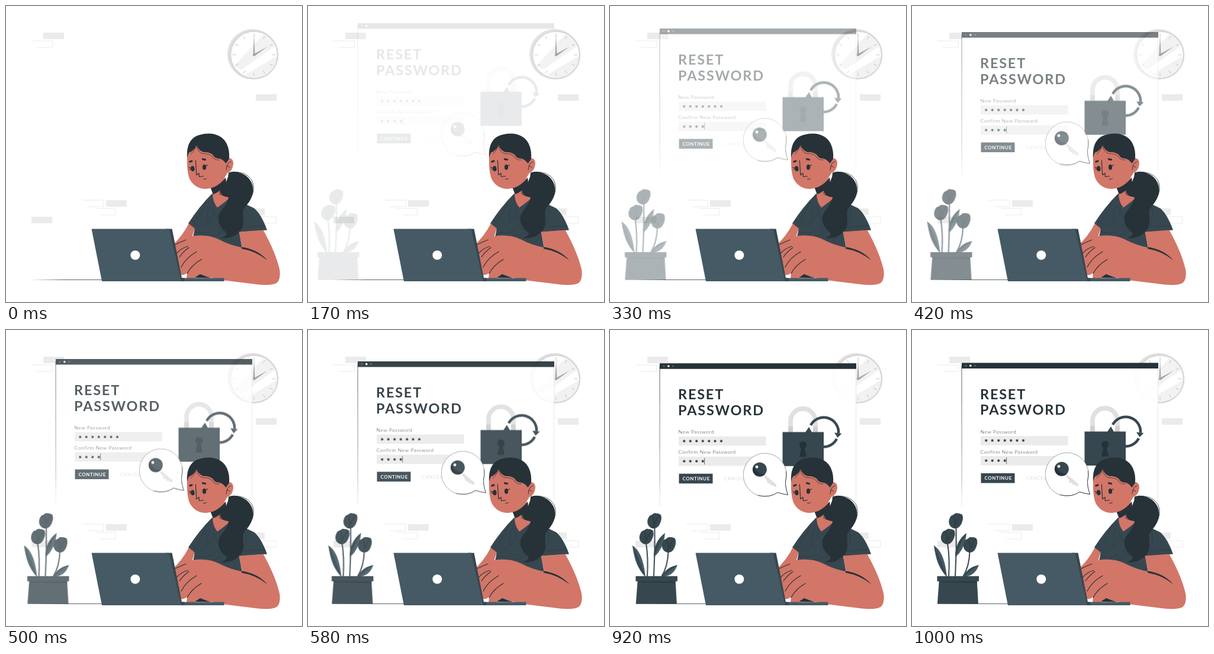
These frames come from a looping animation (500x500 px, 1040 ms). An HTML page without scripts:

```html
<!DOCTYPE html>
<html lang="en">
<head>
<meta charset="utf-8">
<title>Reset password</title>
<style>
  html, body { margin: 0; width: 100%; height: 100%; overflow: hidden; background: #fff; }
  svg { display: block; width: 100vw; height: 100vh; }

  .enter { animation: slide 1040ms infinite, show 1040ms step-end infinite; }
  .down { --from: translateY(-30px); }
  .right { --from: translateX(-30px); }

  @keyframes slide {
    0% { opacity: 0; transform: var(--from); animation-timing-function: cubic-bezier(.36, -.01, .5, 1.38); }
    92.5%, 100% { opacity: 1; transform: translate(0, 0); }
  }
  @keyframes show {
    0% { visibility: hidden; }
    12.5%, 100% { visibility: visible; }
  }

  .ink { fill: #263238; }
  .slate { fill: #37474f; }
  .steel { fill: #455a64; }
  .skin { fill: #d27668; }
  .pale { fill: #ebebeb; }
  .grey { fill: #e0e0e0; }
  .white { fill: #fff; }
  .line { fill: none; stroke: #263238; stroke-linecap: round; stroke-linejoin: round; }
  .arc { fill: none; stroke: #37474f; stroke-width: 4.5; }

  text { font-family: Lato, "Open Sans", sans-serif; fill: #263238; }
  .title { font-size: 23.4px; font-weight: 700; letter-spacing: 1.85px; }
  .label { font-size: 8.5px; font-weight: 300; letter-spacing: .55px; }
  .button { font-size: 8px; font-weight: 700; letter-spacing: .6px; }
  .stars { font: 6.5px "DejaVu Sans", sans-serif; letter-spacing: 5.05px; }
</style>
</head>
<body>
<svg viewBox="0 0 500 500">
  <defs>
    <path id="brick" d="M0 0h35v11h-35z"/>
    <path id="frame" d="M-1 .5H34.5V11.5H8" fill="none" stroke="#ebebeb"/>
    <path id="tick" d="M0-36.5v6" stroke="#c8c8c8"/>
    <g id="tulip">
      <path class="slate" d="M-1 13C-9 12-13 5-11-3-10-7-8-9-6-9-4-12-1-14 1-13 4-14 7-13 9-12 11-9 12-5 11-1 10 7 6 13-1 13Z"/>
      <path class="line" stroke-width=".9" d="M-6-9C-1-4 1 4-1 12M9-11C4-6 2-1 2 5"/>
    </g>
    <linearGradient id="fade" x1="0" y1="0" x2="0" y2="1">
      <stop offset=".75" stop-color="#263238"/>
      <stop offset="1" stop-color="#263238" stop-opacity=".3"/>
    </linearGradient>
  </defs>

  <g class="pale">
    <use href="#brick" x="63" y="45"/>
    <use href="#brick" x="422" y="149"/>
    <use href="#brick" x="169" y="328"/>
    <use href="#brick" x="43" y="356"/>
    <use href="#brick" x="402" y="342"/>
  </g>
  <use href="#frame" x="44" y="58.5"/>
  <use href="#frame" x="130.5" y="327.5"/>
  <use href="#frame" x="150.5" y="341.5"/>
  <use href="#frame" x="422" y="355.5"/>

  <!-- clock -->
  <circle class="grey" cx="416.5" cy="81.5" r="42.5"/>
  <circle class="white" cx="419" cy="82.5" r="40" stroke="#d8d8d8" stroke-width="2.6"/>
  <path d="M386 101 435 47Q449 55 454 68L397 108ZM404 116 457 85Q457 106 437 117Q419 124 404 116Z" fill="#f2f2f2"/>
  <g transform="translate(419 82.5)">
    <use href="#tick"/>
    <use href="#tick" transform="rotate(30)"/>
    <use href="#tick" transform="rotate(60)"/>
    <use href="#tick" transform="rotate(90)"/>
    <use href="#tick" transform="rotate(120)"/>
    <use href="#tick" transform="rotate(150)"/>
    <use href="#tick" transform="rotate(180)"/>
    <use href="#tick" transform="rotate(210)"/>
    <use href="#tick" transform="rotate(240)"/>
    <use href="#tick" transform="rotate(270)"/>
    <use href="#tick" transform="rotate(300)"/>
    <use href="#tick" transform="rotate(330)"/>
    <path d="M-1.5 0 0-35 1.5 0ZM-1-1 23-14 1 2Z" fill="#a6a6a6"/>
    <circle r="2.2" fill="#a6a6a6"/>
  </g>

  <path class="ink" d="M40 462.5 100 462.1H165V462.8H100Z"/>

  <!-- window -->
  <g class="enter down">
    <path class="white" fill-opacity=".93" d="M84 56H416V298H84Z"/>
    <path fill="url(#fade)" d="M83.6 60H84.4L84.2 298H83.9Z"/>
    <path d="M415.6 64V290" stroke="#cfd2d3" stroke-width=".6"/>
    <path class="ink" d="M84 55.5H416V65H84Z"/>
    <circle class="steel" cx="91" cy="60.2" r="1.8"/>
    <circle class="white" cx="98.8" cy="60.2" r="1.8"/>
    <circle class="steel" cx="106.5" cy="60.2" r="1.8"/>

    <text class="title" x="115" y="116.6">RESET</text>
    <text class="title" x="115" y="143.3">PASSWORD</text>

    <text class="label" x="115.5" y="174.5">New Password</text>
    <path class="pale" d="M116 179H263.5V194.7H116ZM116 213H263.5V228.7H116Z"/>
    <text class="stars" x="122.4" y="189.3">✱✱✱✱✱✱✱</text>
    <text class="label" x="115.5" y="208.5">Confirm New Password</text>
    <text class="stars" x="122.4" y="223.3">✱✱✱✱</text>
    <path class="line" stroke-width=".7" d="M159.6 215.5V226"/>

    <path class="slate" d="M116.5 242H173.5V258.5H116.5Z"/>
    <text class="button" x="122.4" y="253.3" style="fill:#fff">CONTINUE</text>
    <text class="button" x="192.5" y="253.3" style="fill:#e0e0e0;font-weight:400">CANCEL</text>
  </g>

  <!-- padlock -->
  <g class="enter down">
    <path d="M305 172V153A21 21 0 0 1 347 153V172" fill="none" stroke="#e0e0e0" stroke-width="7.8"/>
    <path d="M301.1 162H308.900V172H301.1ZM343.1 162H350.900V172H343.1Z" fill="#cfcfcf"/>
    <path class="arc" d="M383 183A25 25 0 0 1 360 196.5"/>
    <path class="slate" d="M291.5 171.5H361V229H291.5Z"/>
    <path class="ink" d="M323 199A6.2 6.2 0 1 1 329 199L332 213.5H320Z"/>
    <path class="arc" d="M339 160A25 25 0 0 1 386 173.5"/>
    <path class="slate" d="M379 172.5 391.5 174 384.5 181ZM336 163 342 173.5 329.5 172.5Z"/>
  </g>

  <!-- speech bubble -->
  <g class="enter down">
    <path class="line" style="fill:#fff" stroke-width=".45" d="M296.5 255Q296 265 300.5 277.5 290 276 283 273.500A36.5 36.500 0 1 1 296.5 255Z"/>
    <path class="line" stroke-width=".8" d="M297.500 238Q298.500 247 296.5 255 296 265 300.5 277.5 290 276 283 273.500 270 283 250 278.500"/>
    <path d="M262 244 281 260V264L277 263.500 275 261 272 262 270 258 266 258 265 253.500 260 247Z" class="grey"/>
    <circle class="slate" cx="252.8" cy="234.8" r="12"/>
    <path class="ink" d="M243 228A12 12 0 0 0 262 242.500 17 17 0 0 1 243 228Z"/>
    <circle class="white" cx="248" cy="230.3" r="2.4"/>
  </g>

  <!-- plant -->
  <g class="enter right">
    <path class="line" style="stroke:#37474f;stroke-width:2" d="M74.500 333Q75.500 375 73 417M60 360Q64 385 62 417M97.500 374Q97 399 86 417"/>
    <path class="steel" d="M37 364C47 370 56 385 59 417 46 404 40 388 37 364ZM92 343C91 360 84 375 73 384 73 365 80 353 92 343ZM113 397C108 411 99 416 87 417 92 404 102 399 113 397Z"/>
    <path class="slate" d="M37 364Q49 387 59 417 46 404 37 364ZM92 343Q81 363 73 384 73 357 92 343ZM113 397Q100 406 87 417 92 403 113 397Z"/>
    <use href="#tulip" transform="translate(74 322.500) rotate(8)"/>
    <use href="#tulip" transform="translate(60.500 349) rotate(10)"/>
    <use href="#tulip" transform="translate(98.500 363) rotate(6)"/>
    <path class="slate" d="M46 420H109.5L112 462.8H42.8ZM42.5 415.8H113V424.5H42.5Z"/>
    <path class="ink" opacity=".6" d="M46 424.5H110V427.5L46 426Z"/>
  </g>

  <!-- torso -->
  <path class="skin" d="M309 367 319 375 313 394 306 430H280V405Q298 389 309 367Z"/>
  <path class="slate" d="M348 317Q326 339 308 367L318.5 375.5Q318 385 314 395L306 459H345L399 410 394 382 441 378.5Q431 351 419 341.500L376 321Z"/>
  <g class="line" stroke-width=".6" opacity=".65">
    <path d="M313 361 323 370M338 329Q331 348 322 361M345 336Q338 350 341 363M350 340Q351 352 361 361M330 372Q345 365 351 350M321 382Q337 386 348 380M336 390Q353 391 364 382M356 371Q366 383 380 386M393 374Q417 372 438 371M405 342Q409 357 401 370"/>
  </g>
  <path class="skin" d="M346 306 371 290 377 325Q369 332 357 340.5 349 331 349 317Z"/>
  <path class="ink" d="M345 306Q361 303 371 290L372 302Q361 314 350 318Z"/>

  <!-- ponytail -->
  <path class="ink" d="M376 281.500Q386 278 396 282C411 287 418 300 417.500 312 416 328 406 336 401 344 399 354 404 366 398 377 390 388 378 394 363 392Q373 389 373 383C363 376 357 367 359 356 361 345 373 339 376 323 367 322 361 318 362 312 364 305 371 302 373 294Q376 288 376 281.500Z"/>
  <path class="line" stroke-width=".8" d="M381 281Q405 278 415 294 421 306 416 319M372 302Q360 308 361 318 367 321 376 322"/>

  <!-- head -->
  <path class="skin" d="M306 252Q305 279 310 292 319 309 338 309 358 307 368 292L374 282Q382 280 384 267 384 257 377 257L370 258 360 232 321 232Z"/>
  <path class="ink" d="M306 257Q304 231 319 221 330 215 345 215.5 365 217 373 233 378 244 377 258L371.5 266Q366 258 359 257.5 353 258 349 251 341 246 334 247 325 244 322 235 317 245 310 247 307 250 306 257Z"/>
  <path class="line" stroke-width=".7" d="M322 236Q323 247 333 249.5 343 249 348 254 352 261 360 260M321 237Q318 246 312 250"/>
  <path class="line" stroke-width=".9" d="M380 263Q373 264 372 277M373 271Q377 270 378 273"/>
  <ellipse class="ink" cx="315.3" cy="274.8" rx="3.2" ry="4.5" transform="rotate(-8 315.3 274.8)"/>
  <ellipse class="ink" cx="335" cy="272.2" rx="3.1" ry="4.5"/>
  <path class="line" stroke-width="1.1" d="M313 274 308.8 272.5M313 276 310 275.5M336 271 340.5 268.5"/>
  <path class="line" stroke-width="3.2" d="M310.8 263 313.8 262M332.5 258.7 336.5 259.5"/>
  <path class="line" stroke-width="1.2" d="M320.3 261 321.8 285.5 326 282.5 326.5 288.5 333.5 287.5"/>
  <path class="line" stroke-width="1" d="M333.500 292.5Q336 293.500 338.500 291.5"/>

  <!-- arm and hand -->
  <path class="skin" d="M393.5 381.500 434.500 378.500Q456 417 462.5 447 464 463 457 468 447 473 426 470.5L369 463.5 347 459Q334 458 328 453L318 460H305L306 451Q297 457 295 453L286 415V399Q302 391 319 388 342 386 359 394 378 404 399 408Z"/>
  <path class="ink" d="M398 407Q425 411 441.5 429.5 422 414 398 410Z"/>
  <path class="ink" d="M319 459 328 453 345 459.5Z"/>
  <path class="line" stroke-width="1.2" d="M286 403Q296 398 304 395M288 418Q296 409 307 406M293 424Q299 415 309 408M296 441Q304 425 322 415M306 452Q313 438 330 428"/>

  <!-- laptop -->
  <path class="steel" d="M235 459.5H368.5V465H235Z"/>
  <path class="slate" d="M270 376.5H280.5L297 459.5H301.5V465H290Z"/>
  <path class="steel" d="M144.5 376.5H275.5L296 465H162Z"/>
  <ellipse class="white" cx="218.3" cy="420.8" rx="8" ry="7.9"/>
</svg>
</body>
</html>
```
